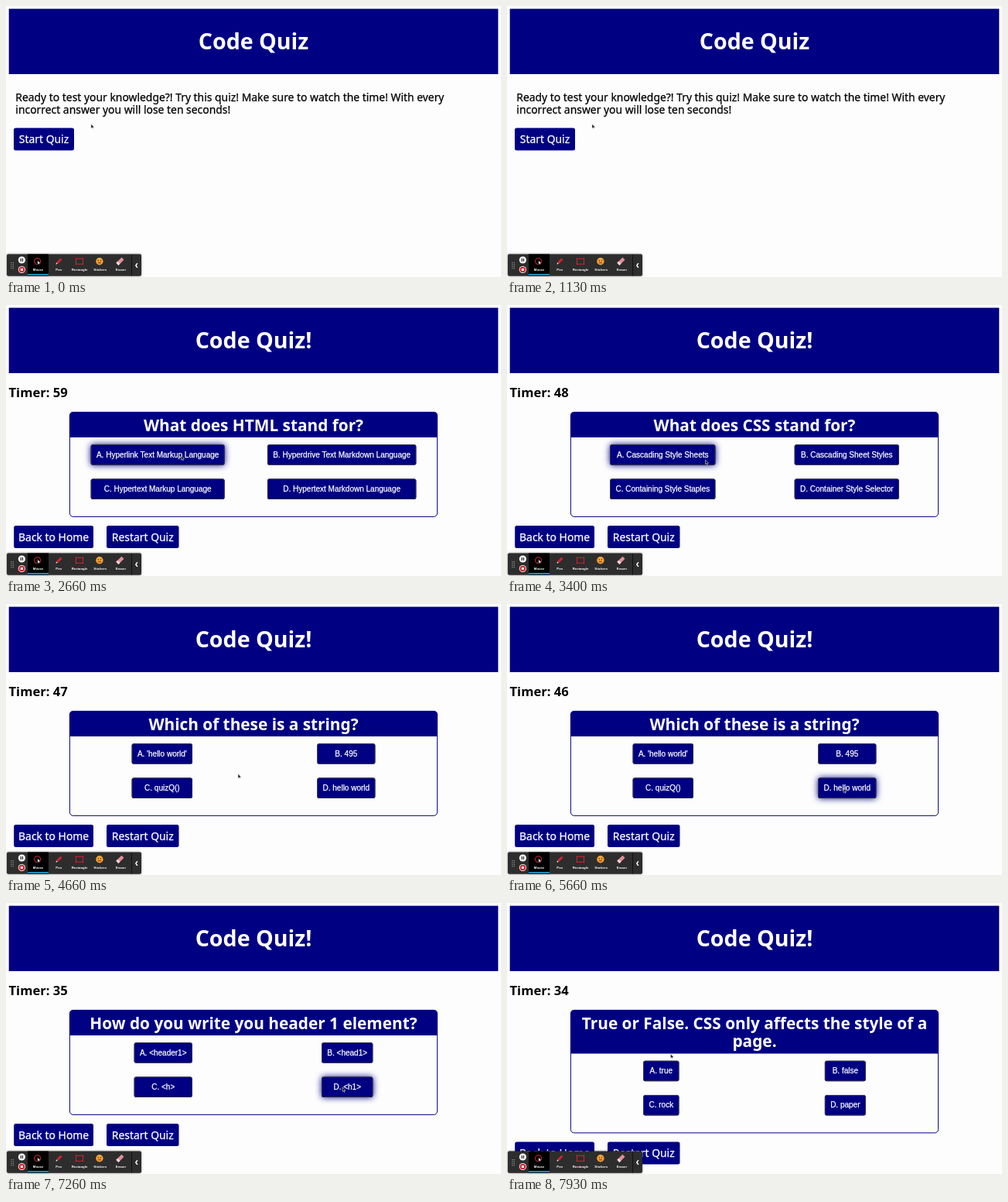
These frames come from a looping animation (640x350 px, 8000 ms). An HTML page with a canvas:

```html
<!DOCTYPE html>
<html lang="en">
<head>
<meta charset="utf-8">
<title>Code Quiz</title>
<style>
  html, body { margin: 0; width: 100%; height: 100%; overflow: hidden; background: #fdfdfd; }
  canvas { display: block; width: 100vw; height: 100vh; }
</style>
</head>
<body>
<canvas id="stage" width="640" height="350"></canvas>
<script>
const ctx = document.getElementById('stage').getContext('2d');
const LOOP = 8000;
const NAVY = '#000083';
const RED = '#d0242e';
const SANS = '"Noto Sans", "Open Sans", sans-serif';
const ARIAL = '"Liberation Sans", Arial, sans-serif';
const OPTION_FONT = '10px ' + ARIAL;
const BODY_FONT = '13.9px ' + SANS;

const START = 1350;                // click on Start Quiz
const FIRST_TICK = START + 1000;   // the timer shows up a second later
const PENALTIES = [3000, 5700];
const TRAVEL = 500;                // longest pointer move

const QUESTIONS = [
  { from: START, title: ['What does HTML stand for?'],
    options: ['A. Hyperlink Text Markup Language', 'B. Hyperdrive Text Markdown Language',
              'C. Hypertext Markup Language', 'D. Hypertext Markdown Language'] },
  { from: 3000, title: ['What does CSS stand for?'],
    options: ['A. Cascading Style Sheets', 'B. Cascading Sheet Styles',
              'C. Containing Style Staples', 'D. Container Style Selector'] },
  { from: 3850, title: ['Which of these is a string?'],
    options: ["A. 'hello world'", 'B. 495', 'C. quizQ()', 'D. hello world'] },
  { from: 5700, title: ['How do you write you header 1 element?'],
    options: ['A. <header1>', 'B. <head1>', 'C. <h>', 'D. <h1>'] },
  { from: 7400, title: ['True or False. CSS only affects the style of a', 'page.'],
    options: ['A. true', 'B. false', 'C. rock', 'D. paper'] }
];

// where the pointer comes to rest, and when
const STOPS = [
  { at: 0, x: 110, y: 152.5 },
  { at: 1630, x: 50, y: 172 },
  { at: 1930, x: 134.5, y: 144.5 },
  { at: 2660, x: 226.5, y: 194.5 },
  { at: 3400, x: 256.5, y: 200 },
  { at: 4660, x: 300, y: 219.5 },
  { at: 5300, x: 435, y: 238 },
  { at: 6530, x: 348.5, y: 224 },
  { at: 7150, x: 435, y: 238 },
  { at: 7930, x: 211.5, y: 195 }
];

function pointerAt(t) {
  const next = STOPS.findIndex(s => s.at > t);
  if (next < 0) return STOPS[STOPS.length - 1];
  const a = STOPS[next - 1], b = STOPS[next];
  const span = Math.min(TRAVEL, b.at - a.at);
  const k = Math.max(0, 1 - (b.at - t) / span);
  const ease = k * k * (3 - 2 * k);
  return { x: a.x + (b.x - a.x) * ease, y: a.y + (b.y - a.y) * ease };
}

// "weight" thickens the glyphs slightly
function text(str, x, y, font, color, align = 'left', weight = 0) {
  ctx.font = font;
  ctx.fillStyle = ctx.strokeStyle = color;
  ctx.textAlign = align;
  ctx.fillText(str, x, y);
  if (weight) {
    ctx.lineWidth = weight;
    ctx.lineJoin = 'round';
    ctx.strokeText(str, x, y);
  }
}

function rect(x, y, w, h, color) {
  ctx.fillStyle = color;
  ctx.fillRect(x, y, w, h);
}

function round(x, y, w, h, r, color) {
  ctx.beginPath();
  ctx.roundRect(x, y, w, h, r);
  ctx.fillStyle = color;
  ctx.fill();
}

function circle(x, y, r, color) {
  round(x - r, y - r, 2 * r, 2 * r, r, color);
}

function outline(x, y, w, h, r, color, width = 1) {
  ctx.beginPath();
  ctx.roundRect(x, y, w, h, r);
  ctx.strokeStyle = color;
  ctx.lineWidth = width;
  ctx.stroke();
}

// draws around (x, y) with the axes turned
function turned(x, y, angle, paint) {
  ctx.save();
  ctx.translate(x, y);
  ctx.rotate(angle);
  paint();
  ctx.restore();
}

function button(label, x, y, w, h, mouse, isOption) {
  const hover = mouse.x > x && mouse.x < x + w && mouse.y > y && mouse.y < y + h;
  ctx.save();
  if (hover) {
    ctx.shadowColor = NAVY;
    ctx.shadowBlur = 9;
  }
  round(x, y, w, h, 2.5, NAVY);
  ctx.restore();
  if (isOption) outline(x + 0.5, y + 0.5, w - 1, h - 1, 2, '#34343c');
  const font = isOption ? OPTION_FONT : BODY_FONT;
  const drop = isOption ? 3.3 : 5.2;
  text(label, x + w / 2, y + h / 2 + drop, font, '#fff', 'center', 0.25);
}

function header(title) {
  rect(3.7, 3.6, 632.6, 84.4, NAVY);
  text(title, 320, 56.2, 'bold 28.6px ' + SANS, '#fff', 'center');
}

function home(mouse) {
  header('Code Quiz');
  const lines = [
    'Ready to test your knowledge?! Try this quiz! Make sure to watch the time! With every',
    'incorrect answer you will lose ten seconds!'
  ];
  lines.forEach((line, i) => text(line, 12.3, 123.2 + i * 16, BODY_FONT, '#000', 'left', 0.25));
  button('Start Quiz', 10, 157.5, 78, 29, mouse);
}

// two columns, each as wide as its longest label, with even space around
function options(list, top, mouse) {
  ctx.font = OPTION_FONT;
  const widths = list.map(s => ctx.measureText(s).width + 14.6);
  const cols = [0, 1].map(c => Math.max(widths[c], widths[c + 2]));
  const gap = (476 - cols[0] - cols[1]) / 4;
  const lefts = [82 + gap, 82 + gap * 3 + cols[0]];
  list.forEach((label, i) => {
    const c = i % 2, row = i >> 1;
    button(label, lefts[c], top + row * 44.2, cols[c], 26.5, mouse, true);
  });
}

function quiz(t, mouse) {
  header('Code Quiz!');
  const timed = t >= FIRST_TICK;
  const top = timed ? 138 : 104;
  if (timed) {
    const lost = 10 * PENALTIES.filter(p => t >= p).length;
    const left = 59 - Math.floor((t - FIRST_TICK) / 1000) - lost;
    text('Timer: ' + left, 3.5, 119.2, 'bold 16.6px ' + SANS, '#000');
  }

  const q = QUESTIONS.filter(item => t >= item.from).pop();
  const extra = (q.title.length - 1) * 23.5;
  outline(82.4, top + 0.4, 475.2, 135 + extra, 4.5, NAVY);
  round(82, top, 476, 33 + extra, [5, 5, 0, 0], NAVY);
  q.title.forEach((line, i) =>
    text(line, 320, top + 24.6 + i * 23.5, 'bold 20.8px ' + SANS, '#fff', 'center'));

  options(q.options, top + 42.2 + extra, mouse);
  const navTop = top + 147.1 + extra;
  button('Back to Home', 10.2, navTop, 102.8, 29, mouse);
  button('Restart Quiz', 130, navTop, 93.5, 29, mouse);
}

function arrow(x, y, fill, edge) {
  ctx.beginPath();
  ctx.moveTo(x, y);
  ctx.lineTo(x, y + 5.6);
  ctx.lineTo(x + 1.4, y + 4.4);
  ctx.lineTo(x + 2.6, y + 6.5);
  ctx.lineTo(x + 2.4, y + 4.2);
  ctx.lineTo(x + 4, y + 4.1);
  ctx.closePath();
  ctx.fillStyle = fill;
  ctx.fill();
  ctx.strokeStyle = edge;
  ctx.lineWidth = 0.6;
  ctx.stroke();
}

const TOOLS = {
  Mouse(x, y) {
    outline(x - 5, y - 4, 8, 8, 4, RED, 1.1);
    arrow(x - 0.8, y - 1.4, '#fff', '#000');
  },
  Pen(x, y) {
    turned(x, y, -Math.PI / 4, () => {
      round(-3, -1.5, 7.5, 3, 0.5, RED);
      rect(-5, -0.6, 2, 1.2, '#fff');
    });
  },
  Rectangle(x, y) {
    outline(x - 4.5, y - 3.5, 9, 7, 0, RED);
    for (const dx of [-4.5, 4.5])
      for (const dy of [-3.5, 3.5]) circle(x + dx, y + dy, 0.9, RED);
  },
  Stickers(x, y) {
    circle(x - 0.8, y, 4.7, '#f5a535');
    for (const dx of [-2.4, 0.8]) circle(x + dx, y - 1, 0.8, '#5b3010');
    round(x - 3, y + 1, 4.4, 1.8, 0.9, '#b04a20');
  },
  Eraser(x, y) {
    turned(x - 1, y, -Math.PI / 4, () => {
      rect(-5, -2.2, 10, 4.4, '#e58e98');
      rect(-5, -2.2, 3, 4.4, '#f7d4d6');
    });
  }
};

function toolbar() {
  ctx.save();
  ctx.shadowColor = 'rgba(0,0,0,.45)';
  ctx.shadowBlur = 3;
  round(1, 320.5, 174, 28.3, 2, '#2d2d2d');
  ctx.restore();
  rect(28, 320.5, 27, 28, '#000');
  rect(28, 346, 27, 1.7, '#18a0d8');
  rect(162, 321, 1, 27.5, '#111');

  for (let i = 0; i < 8; i++) rect(6.4 + (i % 2) * 2.4, 331 + (i >> 1) * 2.4, 1.1, 1.1, '#aaa');

  for (const y of [328, 340.5]) circle(20.4, y, 4.6, '#fff');
  for (const x of [18.7, 20.9]) rect(x, 326, 1.2, 4, '#222');
  circle(20.4, 340.5, 3.8, RED);
  rect(18.9, 339, 3, 3, '#fff');

  Object.keys(TOOLS).forEach((name, i) => {
    const x = 41.6 + i * 26.7;
    TOOLS[name](x, 329.8);
    text(name, x, 341.8, 'bold 4.3px ' + ARIAL, '#fff', 'center');
  });
  text('‹', 168.8, 338.5, 'bold 14px ' + ARIAL, '#fff', 'center');
}

function draw(t) {
  const mouse = pointerAt(t);
  rect(0, 0, 640, 350, '#fdfdfd');
  if (t < START) home(mouse);
  else quiz(t, mouse);
  toolbar();
  arrow(mouse.x, mouse.y, '#111', '#ddd');
}

const begin = performance.now();
function tick() {
  draw((performance.now() - begin) % LOOP);
  requestAnimationFrame(tick);
}
tick();
</script>
</body>
</html>
```
